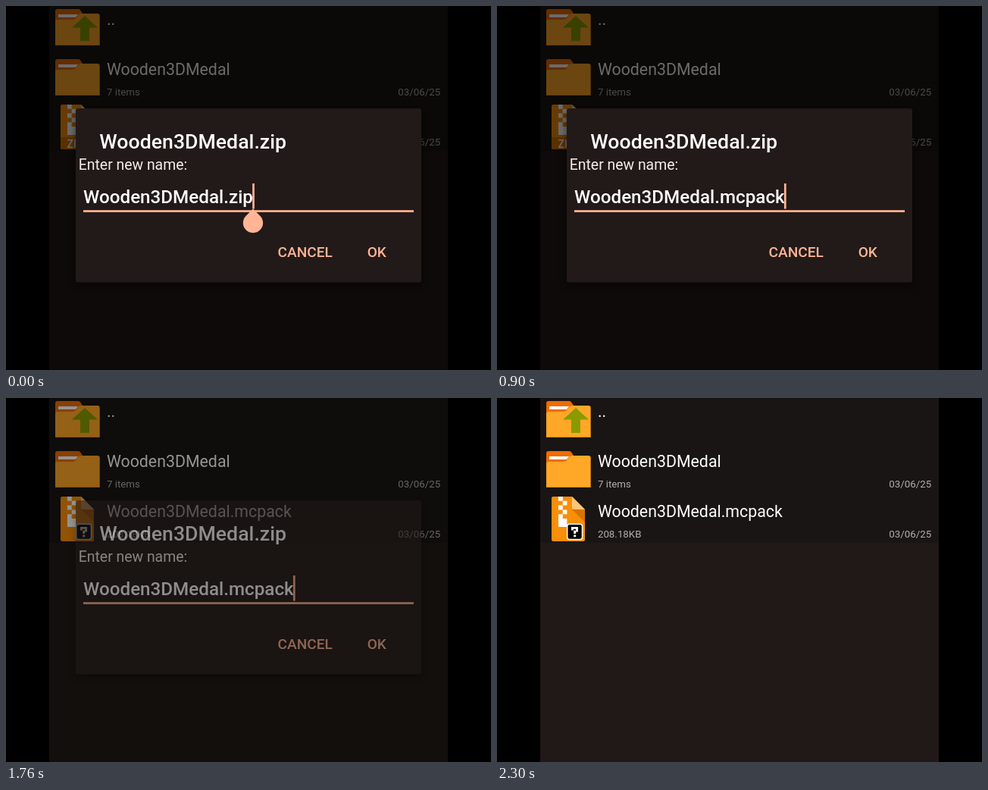
Write an HTML page that moves like this. It is 640 px wide and 480 px high and loops after 2.36 s.

```html
<!DOCTYPE html>
<html lang="en">
<head>
<meta charset="utf-8">
<title>Rename dialog</title>
<style>
html, body { margin: 0; width: 100%; height: 100%; overflow: hidden; background: #000; }
svg { display: block; width: 640px; height: 480px; font-family: Roboto, sans-serif; }
.name { font-size: 21.33px; fill: #fff; }
.info { font-size: 13.33px; fill: #b2aeac; }
.title { font-size: 26.67px; font-weight: 500; fill: #fff; }
.label { font-size: 19.4px; fill: #f3eeec; }
.input { font-size: 24.2px; font-weight: 500; fill: #fff; }
.button { font-size: 19.1px; font-weight: 500; }
.accent { fill: #ffb596; }
</style>
</head>
<body>
<svg viewBox="0 0 640 480" xmlns="http://www.w3.org/2000/svg">
  <defs>
    <filter id="blur" x="-10%" y="-10%" width="120%" height="125%">
      <feGaussianBlur stdDeviation="5"/>
    </filter>
    <g id="folder">
      <path fill="#ef6c00" d="M65 52V7Q65 4 68 4H95Q97.500 4 98.500 6L101 10L104 14V52Z"/>
      <path fill="#fff" d="M69 11H95L92 15H69Z"/>
      <path fill="#ffa726" d="M65 21Q65 18 68 18H88Q91 18 93 15L95 12Q96.500 10 99 10H120.700Q123.700 10 123.700 13V51.500H65Z"/>
      <path fill="#ef8a10" d="M65 51H123.700V52H65Z"/>
    </g>
    <g id="page">
      <path fill="#f98e08" d="M74 130H99L116 147V186.500Q116 189 113.500 189H74.500Q72 189 72 186.500V132Q72 130 74 130Z"/>
      <path fill="#d87300" d="M99 147H116V164Z"/>
      <path fill="#ffc477" d="M99 130L116 147H101Q99 147 99 145Z"/>
      <path fill="#fff" d="M81 130h5.700v5.800h-5.700zM86.700 135.800h5.700v5.800h-5.700zM81 141.600h5.700v5.800h-5.700zM86.700 147.400h5.700v5.800h-5.700zM81 153.200h5.700v5.800h-5.700zM81 159h11.400v11h-11.400z"/>
    </g>
  </defs>

  <rect width="640" height="480" fill="#000"/>
  <rect x="57" width="526" height="480" fill="#211917"/>
  <rect x="57" width="526" height="191" fill="#191514"/>

  <use href="#folder"/>
  <path fill="#8a9a00" d="M104 13L121 28.500H110V46H98V28.500H87Z"/>
  <text class="name" x="133" y="25.300">..</text>

  <use href="#folder" y="66"/>
  <text class="name" x="132.900" y="91" id="dirName"></text>
  <text class="info" x="132.900" y="118">7 items</text>
  <text class="info" x="573.200" y="118" text-anchor="end">03/06/25</text>

  <use href="#page"/>
  <g id="zipMark">
    <path fill="#d87300" d="M72 173H116V186.500Q116 189 113.500 189H74.500Q72 189 72 186.500Z"/>
    <text x="80.500" y="186.500" font-size="14" font-weight="500" fill="#fff">ZIP</text>
  </g>
  <g id="unknownMark">
    <rect x="92.700" y="166.200" width="19.800" height="20.300" rx="3" fill="#000" stroke="#fff" stroke-width="1.500"/>
    <path fill="#fff" d="M98 170H107V176.500H104.200V179H101.200V174.800H104.200V172.800H100.800V174.500H98ZM101.200 180.500H104.200V183.300H101.200Z"/>
  </g>
  <text class="name" x="132.900" y="156.600" id="fileName"></text>
  <text class="info" x="132.900" y="183.600">208.18KB</text>
  <text class="info" x="573.200" y="183.600" text-anchor="end">03/06/25</text>

  <rect id="scrim" x="57" width="526" height="480" fill="#000"/>

  <g id="dialog">
    <rect x="91" y="140" width="458" height="229" rx="4" fill="#000" opacity=".45" filter="url(#blur)"/>
    <rect x="92" y="135" width="456" height="229.500" rx="3" fill="#221a18"/>
    <text class="title" x="123.300" y="188" id="title"></text>
    <text class="label" x="95.800" y="216">Enter new name:</text>
    <text class="input" x="102" y="260" id="input"></text>
    <rect class="accent" x="102" y="269.200" width="436" height="2.700"/>
    <rect class="accent" id="caret" y="234" width="2.700" height="33.500"/>
    <path class="accent" id="handle" d="M0 267.400L9.300 276.700A13.150 13.150 0 1 1 -9.300 276.700Z"/>
    <text class="button accent" x="358.500" y="330.800">CANCEL</text>
    <text class="button accent" x="476.700" y="330.800">OK</text>
  </g>
</svg>
<script>
const LOOP = 2360, TICK = 200 / 3;
const BASE = 'Wooden3DMedal';
const ENDINGS = ['.zip', '.zi', '.z', '.', '.m', '.mc', '.mcp', '.mcpac', '.mcpack'];
const TYPED = 560, BLINK = 500, CLOSE = 1680, REFRESH = 1750;
const DIM = 0.58, DIM_TIME = 290, FADE_TIME = 168;

const $ = id => document.getElementById(id);
const show = (id, on) => $(id).setAttribute('visibility', on ? 'visible' : 'hidden');
const clamp = v => Math.max(0, Math.min(1, v));

// The screen refreshes about 15 times a second, after a longer first hold.
function tickAt(ms) {
  if (ms < 100) return { step: 0, t: 0 };
  let n = Math.floor((ms - 100) / TICK) + 1;
  const start = k => Math.floor((100 + k * TICK + 0.01) / 10) * 10;
  if (start(n) > ms) n--;
  return { step: n + 1, t: start(n) };
}

function draw(ms) {
  const { step, t } = tickAt(ms);
  const ending = ENDINGS[Math.min(step, ENDINGS.length - 1)];
  const renamed = t >= REFRESH;

  $('input').textContent = BASE + ending;
  const x = 102 + $('input').getComputedTextLength();
  $('caret').setAttribute('x', x - 0.8);
  $('handle').setAttribute('transform', `translate(${x} 0)`);
  const caretOn = t < TYPED || Math.floor((t - TYPED) / BLINK) % 2 === 0;
  $('caret').setAttribute('opacity', caretOn ? 1 : 0);
  $('handle').setAttribute('opacity', step === 0 ? 1 : 0);

  $('fileName').textContent = BASE + (renamed ? '.mcpack' : '.zip');
  show('zipMark', !renamed);
  show('unknownMark', renamed);

  $('scrim').setAttribute('opacity', DIM * clamp(1 - (t - CLOSE) / DIM_TIME));
  $('dialog').setAttribute('opacity', clamp(1 - (t - CLOSE) / FADE_TIME));
}

$('dirName').textContent = BASE;
$('title').textContent = BASE + '.zip';

const began = performance.now();
function frame() {
  draw((performance.now() - began) % LOOP);
  requestAnimationFrame(frame);
}
draw(0);
requestAnimationFrame(frame);
</script>
</body>
</html>
```
